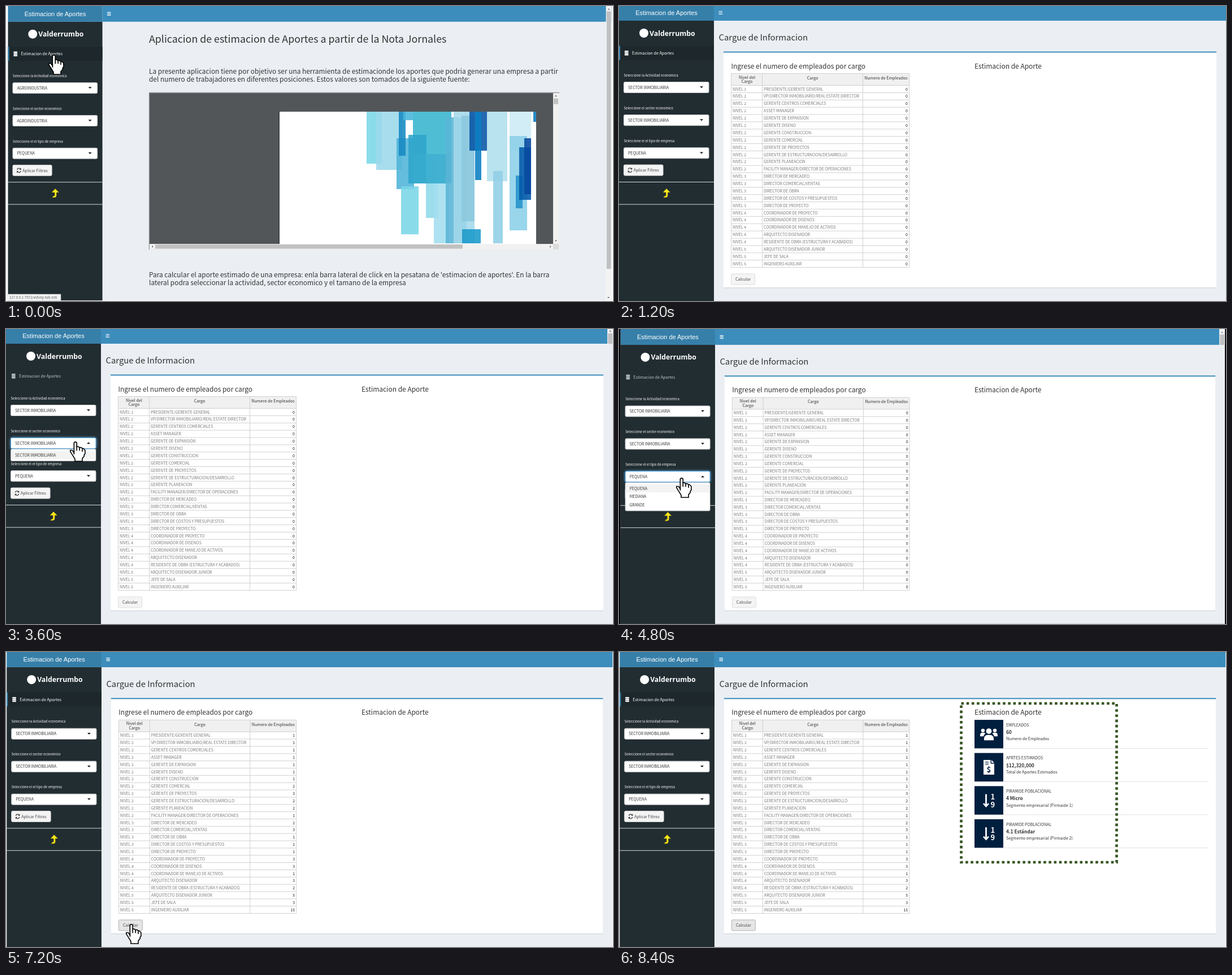
Recreate the animation shown at these times as an HTML page. Size 1074 by 522 pixels, loop 9.6 s.

```html
<!DOCTYPE html>
<html lang="es">
<head>
<meta charset="utf-8">
<title>Estimacion de Aportes</title>
<style>
html, body { margin: 0; width: 100%; height: 100%; overflow: hidden; }
svg { display: block; width: 1074px; height: 522px; font-family: 'Noto Sans CJK SC', 'Noto Sans CJK JP', 'Noto Sans CJK', 'Noto Sans', sans-serif; }
text { white-space: pre; }
</style>
</head>
<body>
<svg id="stage" viewBox="0 0 1074 522"></svg>
<script>
const STEP = 1200;
const ESTATE = 'SECTOR INMOBILIARIA', AGRO = 'AGROINDUSTRIA';
const roles = [
  'PRESIDENTE/GERENTE GENERAL',
  'VP/DIRECTOR INMOBILIARIO/REAL ESTATE DIRECTOR|GERENTE CENTROS COMERCIALES|ASSET MANAGER|GERENTE DE EXPANSION|GERENTE DISENO|GERENTE CONSTRUCCION|GERENTE COMERCIAL|GERENTE DE PROYECTOS|GERENTE DE ESTRUCTURACION/DESARROLLO|GERENTE PLANEACION|FACILITY MANAGER/DIRECTOR DE OPERACIONES',
  'DIRECTOR DE MERCADEO|DIRECTOR COMERCIAL/VENTAS|DIRECTOR DE OBRA|DIRECTOR DE COSTOS Y PRESUPUESTOS|DIRECTOR DE PROYECTO',
  'COORDINADOR DE PROYECTO|COORDINADOR DE DISENOS|COORDINADOR DE MANEJO DE ACTIVOS|ARQUITECTO DISENADOR|RESIDENTE DE OBRA (ESTRUCTURA Y ACABADOS)',
  'ARQUITECTO DISENADOR JUNIOR|JEFE DE SALA|INGENIERO AUXILIAR'
].flatMap((group, i) => group.split('|').map(name => ({ level: i + 1, name })));
const staff = [1, 1, 1, 1, 1, 1, 1, 2, 3, 2, 2, 1, 2, 3, 1, 1, 1, 3, 3, 1, 3, 2, 5, 3, 15];

const rect = (x, y, w, h, fill, extra = '') =>
  `<rect x="${x}" y="${y}" width="${w}" height="${h}" fill="${fill}" ${extra}/>`;
const path = (d, fill, extra = '') => `<path d="${d}" fill="${fill}" ${extra}/>`;
const line = (d, stroke, width = 1) => path(d, 'none', `stroke="${stroke}" stroke-width="${width}"`);
const circle = (x, y, r, fill) => `<circle cx="${x}" cy="${y}" r="${r}" fill="${fill}"/>`;
const text = (x, y, s, size = 7, fill = '#333', extra = '') =>
  `<text x="${x}" y="${y}" font-size="${size}" fill="${fill}" ${extra}>${s}</text>`;
const middle = 'text-anchor="middle"', right = 'text-anchor="end"';
const group = (transform, body) => `<g transform="${transform}">${body}</g>`;
const zoom = (s, x, y, body) => group(`translate(${x} ${y}) scale(${s}) translate(${-x} ${-y})`, body);
const arrow = (x, y, turn, size = 2, fill = '#555') =>
  group(`translate(${x} ${y}) rotate(${turn})`, path(`M${-size} ${size / 2}h${2 * size}L0 ${-size / 2}z`, fill));

function select(y, label, value, options) {
  const border = options ? 'stroke="#4fa3e0" style="filter:drop-shadow(0 0 2px #66afe9)"' : 'stroke="#ccc"';
  return text(8.5, y - 9.3, label, 6, '#fff')
    + rect(8.5, y + .5, 150.5, 19, '#fff', `rx="2" stroke-width="1" ${border}`)
    + text(16, y + 12.7, value, 6.9)
    + arrow(146, y + 9.7, options ? 0 : 180, 3, '#111');
}

function dropdown(y, value, options) {
  const top = y + 20.5;
  return rect(8.5, top, 150.5, 6.3 + 14.7 * options.length, '#fff', 'rx="2" stroke="#c8c8c8" stroke-width=".7"')
    + options.map((name, i) => {
      const itemY = top + 3.2 + 14.7 * i;
      return rect(9, itemY, 149.5, 14.7, name === value ? '#f4f3f4' : '#fff') + text(16, itemY + 9.8, name, 6.9);
    }).join('');
}

function sidebar({ active = true, sector = ESTATE, open = -1, options }) {
  const ink = active ? '#fff' : '#b8c7ce';
  const fields = [
    ['Seleccione la Actividad economica', sector],
    ['Seleccione el sector economico', sector],
    ['Seleccione el el tipo de empresa', 'PEQUENA']
  ];
  const fieldY = i => 134 + 58.1 * i;
  return rect(0, 26, 168, 496, '#222d32') + rect(0, -6, 168, 32, '#367fa9')
    + text(84, 16, 'Estimacion de Aportes', 11, '#fff', `${middle} font-family="Liberation Sans, Arial, sans-serif"`)
    + circle(44, 48, 8, '#fff')
    + text(54, 52.5, 'Valderrumbo', 12.3, '#fff', 'font-weight="700" font-family="Open Sans, sans-serif"')
    + (active ? rect(0, 70.5, 168, 25, '#1e282c') + rect(0, 70.5, 2, 25, '#3c8dbc') : '')
    + [79, 82, 85].map(y => rect(9.8, y, 7, 2.4, ink, 'rx="1"')).join('')
    + text(23, 86, 'Estimacion de Aportes', 7.13, ink)
    + fields.map(([label, value], i) => select(fieldY(i), label, value, i === open)).join('')
    + rect(8.5, 281, 69.5, 19, '#f4f4f4', 'rx="2" stroke="#ddd"')
    + line('M16.2 289.5a3.3 3.3 0 0 1 6-1.4M22.8 291.5a3.3 3.3 0 0 1-6 1.4', '#333', 1.2)
    + path('M23.3 286v3.3h-3.3zM15.7 295v-3.3h3.3z', '#333')
    + text(26, 293.2, 'Aplicar Filtros', 7, '#444')
    + line('M0 311.5H168M0 351H168', '#d5d9db')
    + path('M84 323l7 7h-4.6v5q0 4-4 4h-4l2.6-3h1q1 0 1-1v-5h-5.5z', '#fbe81c', 'stroke="#3b3a10" stroke-width=".5"')
    + (options ? dropdown(fieldY(open), fields[open][1], options) : '');
}

const scrollbar = (track, thumb) => rect(1064, -6, 10, track + 6, '#f3f3f3')
  + rect(1065.2, 7.5, 7.8, thumb - 7.5, '#bfc0c2') + arrow(1069, 3.5, 0);

function table(counts) {
  const rowH = 12.88, top = 140.5;
  const rules = roles.map((_, i) => `M198.5 ${top + rowH * (i + 1)}h315`).join('');
  return rect(198.5, 119.5, 315, 322 + 21, '#fff') + rect(198.5, 119.5, 315, 21, '#f0f0f0')
    + line(`M198.5 119.5h315M198.5 ${top}h315${rules}M198.5 119.5v343M253.5 119.5v343M431.5 119.5v343M513.5 119.5v343`, '#ccc', .9)
    + text(226.5, 128.6, 'Nivel del', 7.2, '#333', middle) + text(226.5, 136.4, 'Cargo', 7.2, '#333', middle)
    + text(342.5, 129.8, 'Cargo', 7.2, '#333', middle) + text(472.5, 129.8, 'Numero de Empleados', 7.2, '#333', middle)
    + roles.map(({ level, name }, i) => {
      const y = 149.6 + rowH * i;
      return text(201, y, `NIVEL ${level}`, 6.88, '#777') + text(256, y, name, 6.88, '#777')
        + text(511, y, counts ? counts[i] : 0, 7, '#222', right);
    }).join('');
}

const icons = {
  people: circle(-10.6, -6.5, 3.2, '#fff') + circle(10.6, -6.5, 3.2, '#fff') + circle(0, -5.3, 4.9, '#fff')
    + path('M-8.5 11v-3.500a6 6 0 0 1 6-6h5a6 6 0 0 1 6 6v3.500zM-15.500 4v-2.500a4 4 0 0 1 4-4h2.500q2 0 3 1.500q-3 1.500-3.500 5zM15.500 4v-2.500a4 4 0 0 0-4-4h-2.500q-2 0-3 1.500q3 1.500 3.500 5z', '#fff'),
  bill: path('M-9.500-13H3v6.500h6.500V13h-19zM4.500-13l5 5h-5z', '#fff')
    + line('M-6.500-9h6M-6.500-5.500h6', '#001f3f', 1.3)
    + text(0, 9, '$', 13, '#001f3f', `${middle} font-weight="700"`),
  order: line('M-5-11v20', '#fff', 2.8) + line('M-9.500 5.500l4.500 5 4.500-5', '#fff', 2.6)
    + text(7, -1.5, '1', 13, '#fff', `${middle} font-weight="900"`)
    + text(7, 12, '9', 13, '#fff', `${middle} font-weight="900"`)
};

const results = () => [
  ['people', 'EMPLEADOS', '60', 'Numero de Empleados'],
  ['bill', 'APRTES ESTIMADOS', '$12,320,000', 'Total de Aportes Estimados'],
  ['order', 'PIRAMIDE POBLACIONAL', '4 Micro', 'Segmento empresarial (Pirmaide 1)'],
  ['order', 'PIRAMIDE POBLACIONAL', '4.1 Estándar', 'Segmento empresarial (Pirmaide 2)']
].map(([icon, title, value, note], i) => group(`translate(629 ${119.3 + 58.75 * i})`,
  rect(0, 50.3, 415, 1, '#e2e2e2') + rect(0, 0, 51, 50.5, '#001f3f')
  + group('translate(25.5 25.3)', icons[icon])
  + text(56, 11.6, title, 7) + text(56, 25, value, 8.4, '#333', 'font-weight="700"') + text(56, 36.5, note, 7.2))).join('');

const form = ({ counts, focus, result }) => text(176.5, 60.7, 'Cargue de Informacion', 14.84)
  + rect(185, 81, 872, 418.3, '#d3d8dd') + rect(185, 81, 872, 417, '#fff') + rect(185, 80.5, 872, 2, '#3c8dbc')
  + text(198.5, 110.6, 'Ingrese el numero de empleados por cargo', 11.98)
  + text(629, 110.6, 'Estimacion de Aporte', 11.98)
  + table(counts)
  + rect(198.5, 474, 42, 19, focus ? '#e6e6e6' : '#f4f4f4', `rx="1.5" stroke="${focus ? '#b0b0b0' : '#ddd'}"`)
  + text(219.5, 486.3, 'Calcular', 7.03, '#444', middle)
  + (result ? results() : '');

// Overlapping translucent bars of the report cover: left, top, right, bottom.
const bars = [
  [638, 187, 665, 279, '#7cd8e8'], [655, 187, 701, 290, '#9cd9ec'], [691, 234, 722, 324, '#4fb4d8'],
  [695, 187, 707, 265, '#1689c2'], [703, 187, 720, 202, '#48b6dc'], [699, 319, 730, 404, '#7ad7e8'],
  [720, 187, 788, 262, '#37b5d0'], [712, 228, 744, 314, '#2fa6cb'], [743, 262, 765, 375, '#8fdaea'],
  [757, 262, 784, 420, '#a3dfef'], [720, 262, 788, 314, '#35abcd'], [778, 197, 815, 420, '#5bb6d6'],
  [792, 187, 829, 420, '#a4d9ea'], [806, 194, 829, 381, '#8cc9df'], [851, 187, 887, 310, '#b1e0ee'],
  [862, 292, 879, 420, '#91d0e6'], [820, 187, 851, 256, '#0755a6'], [830, 187, 841, 308, '#0b7fc4'],
  [807, 395, 840, 420, '#1b9acb'], [891, 187, 929, 255, '#cdebf6'], [891, 230, 922, 397, '#8bd0e9'],
  [902, 300, 914, 358, '#2592cb'], [908, 250, 929, 343, '#0459aa'], [917, 234, 929, 333, '#0748a0'],
  [933, 187, 938, 205, '#087cc0']
];

const viewer = () => rect(253, 153, 726, 278, '#eee') + rect(253, 153, 716, 268, '#525659')
  + line('M253.500 431V153.500H979', '#8d8f91', 1.3)
  + rect(482.5, 187, 1.5, 234, '#393c3e') + rect(484, 187, 454, 234, '#fff')
  + bars.map(([x, y, x2, y2, fill]) => rect(x, y, x2 - x, y2 - y, fill, 'opacity=".88"')).join('')
  + rect(968, 154, 10, 267, '#f1f1f1') + rect(969, 163.500, 8, 10, '#c1c1c1') + arrow(973, 159, 0) + arrow(973, 415.5, 180)
  + rect(254, 421, 714, 9.5, '#f1f1f1') + rect(264, 422, 544, 7.5, '#c1c1c1') + arrow(259, 425.7, 270) + arrow(963.5, 425.7, 90)
  + rect(968, 421, 10, 9.5, '#dcdcdc');

const intro = () => text(253, 65, 'Aplicacion de estimacion de Aportes a partir de la Nota Jornales', 17.8)
  + [
    [119.6, 'La presente aplicacion tiene por objetivo ser una herramienta de estimacionde los aportes que podria generar una empresa a partir'],
    [134.1, 'del numero de trabajadores en diferentes posiciones. Estos valores son tomados de la siguiente fuente:'],
    [479.6, "Para calcular el aporte estimado de una empresa: enla barra lateral de click en la pesatana de 'estimacion de aportes'. En la barra"],
    [493.8, 'lateral podra seleccionar la actividad, sector economico y el tamano de la empresa']
  ].map(([y, s]) => text(253, y, s, 11.9)).join('')
  + viewer() + arrow(1066, 516, 180)
  + rect(3, 510, 94, 11, '#f4f5f6', 'stroke="#c5c8ca" stroke-width=".6"')
  + text(6, 517.8, '127.0.0.1:7972/#shiny-tab-esti', 6.05, '#555');

const hand = (x, y) => group(`translate(${x - 9} ${y}) scale(1.63)`,
  path('M4.500 12V1.500L5.500.5h1L7.500 1.500v4H9l1.500 1H12l1.500 1h1l2 2v4l-1 1V16l-2 2.500v3h-8V19L1.500 12.500.5 11V9.500h2L4.500 12z', '#fff', 'stroke="#000"')
  + line('M7.500 5v5M10.500 6.500V10M13.500 8v3M4.500 10v4', '#000'));

const dotted = (x, y, w, h) => rect(x, y, w, h, 'none', 'stroke="#375623" stroke-width="4.700" stroke-dasharray="4.600"');

const scenes = [
  { scale: .9944, originY: 351, home: true, sector: AGRO, track: 522, thumb: 466, overlay: hand(84, 86) },
  {},
  { active: false, open: 0, track: 26, thumb: 26, overlay: hand(122, 141),
    options: [AGRO, 'COMERCIO', 'CONSTRUCCION', 'EDUCACION', 'SALUD', ESTATE, 'TECNOLOGIA'] },
  { active: false, open: 1, options: [ESTATE], track: 26, thumb: 26, overlay: hand(122, 199) },
  { scale: .9957, backdrop: '#000', active: false, open: 2, options: ['PEQUENA', 'MEDIANA', 'GRANDE'],
    track: 26, thumb: 26, overlay: hand(110, 263) },
  { scale: .9957, counts: staff, focus: true, overlay: dotted(453.5, 140, 67.5, 333.5) },
  { scale: .998, counts: staff, focus: true, overlay: hand(221, 481) },
  { scale: .998, counts: staff, focus: true, result: true, overlay: dotted(605.5, 91, 275, 281) }
];

function draw(scene) {
  const { scale = 1, originY = 498, backdrop = '#fff', home, track, thumb, overlay = '' } = scene;
  const page = rect(0, -6, 1074, 528, '#ebeff4') + rect(168, -6, 906, 32, '#3c8dbc')
    + line('M176.500 9.500h6.500M176.500 12h6.500M176.500 14.500h6.500', '#fff', 1.2)
    + (home ? '' : form(scene)) + sidebar(scene) + (track ? scrollbar(track, thumb) : '');
  return rect(0, 0, 1074, 522, backdrop) + zoom(scale, 629, originY, page) + (home ? intro() : '') + overlay;
}

const stage = document.getElementById('stage');
let shown = -1;
function tick() {
  const index = Math.floor(performance.now() / STEP) % scenes.length;
  if (index !== shown) stage.innerHTML = draw(scenes[shown = index]);
  requestAnimationFrame(tick);
}
tick();
</script>
</body>
</html>
```
